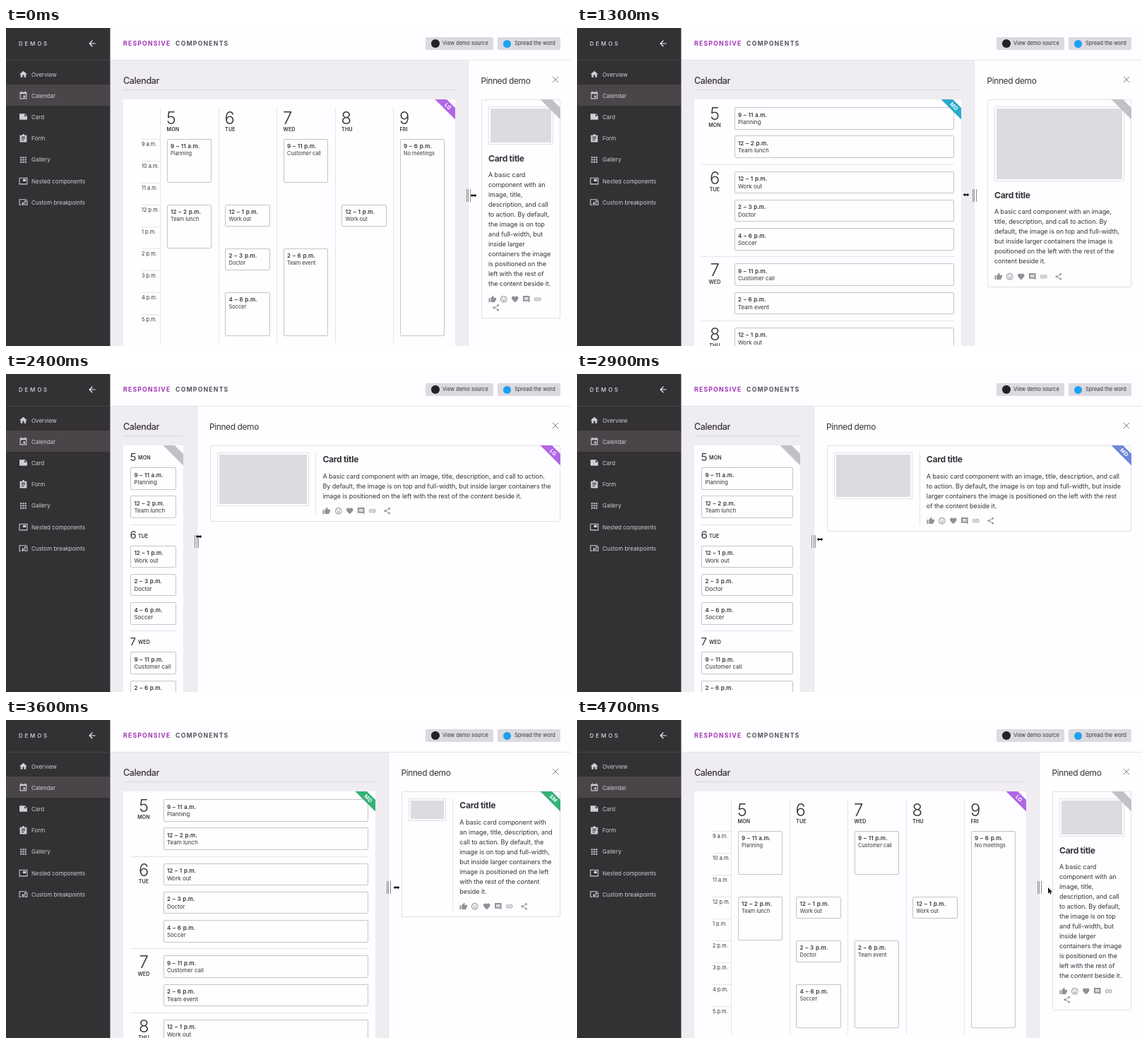
Animation, 800 px wide and 450 px high, one loop 5000 ms. Source, as an HTML page:

```html
<!DOCTYPE html>
<html lang="en">
<head>
<meta charset="utf-8">
<title>Responsive components</title>
<style>
  html, body { margin: 0; width: 100%; height: 100%; overflow: hidden; background: #fefdff; }
  #stage { position: relative; width: 800px; height: 450px; overflow: hidden; color: #38343a;
    font-family: Inter, "Open Sans", sans-serif; font-size: 8px; }
  #stage div, #stage svg { position: absolute; box-sizing: border-box; }
  #view { inset: 0; }
  .t { line-height: 20px; white-space: nowrap; }
  .mid { transform: translateX(-50%); }
  .side { background: #333134; }
  .rule { background: #e6e4e9; }
  .active { background: #494549; }
  .demos { color: #dddbdf; font-weight: 500; letter-spacing: 2.75px; }
  .nav { color: #d0ced2; }
  .brand { font-size: 8.7px; font-weight: 700; letter-spacing: 1.2px; color: #57515a; }
  .hot { color: #a136b4; }
  .btn { background: #dcdae0; border-radius: 2px; }
  .btnText { font-size: 7.4px; }
  .dot { border-radius: 50%; }
  .page { background: #efedf1; }
  .white { background: #fefdff; }
  .heading { font-size: 12.5px; font-weight: 500; letter-spacing: -.03em; }
  .pinned { font-size: 11.9px; letter-spacing: -.03em; }
  .bar { background: #8a888c; }
  .event { border: 1px solid #c6c4c9; border-radius: 2px; background: #fefdff; }
  .when { font-weight: 600; word-spacing: .75px; }
  .small, .hour { font-size: 7.35px; }
  .num { font-size: 23.8px; font-weight: 300; letter-spacing: -.02em; }
  .num.inline { font-size: 15px; font-weight: 400; }
  .day { font-size: 7.1px; font-weight: 600; letter-spacing: .1px; }
  .card { border: 1px solid #e2e0e5; border-radius: 2px; padding: 9px 9px 8.5px; }
  #stage .card div { position: relative; }
  .card .pic { border: 1px solid #e2e0e5; padding: 2px; background: #dddbe0 content-box; }
  .card .body.split { border-left: 1px solid #e6e4e9; padding-left: 9px; }
  .card .title { font-size: 12.1px; font-weight: 700; letter-spacing: -.025em; line-height: 20px; }
  .copy { font-size: 9.05px; line-height: 14px; letter-spacing: -.009em; margin: 6.5px 0 8.75px; }
  .probe { position: absolute; white-space: nowrap; visibility: hidden; }
  .card .icons { display: flex; flex-wrap: wrap; }
  #stage .icons svg { position: static; flex: none; margin-right: 4.6px; }
  #stage .icons svg:last-child { margin-left: 5px; }
</style>
</head>
<body>
<div id="stage"><div id="view"></div><div id="chrome"></div><svg id="cursor" width="24" height="24" viewBox="-12 -12 24 24"></svg></div>
<script>
const LOOP = 5000, STEP = 100, SIDE = 147.5;
const $ = id => document.getElementById(id);

// time, splitter x, pointer offset from the splitter, pointer y
const DRAG = [
  [0, 654.5, 7, 236.5], [100, 654.5, 6.5, 236.5], [500, 654.5, 6.5, 236.5], [600, 654, 4, 236.5],
  [800, 650, -3, 236], [1000, 639, -7.5, 236], [1100, 618, -10, 236], [1300, 562.5, -12, 236],
  [1400, 528, -14, 235], [1900, 340.5, -17.5, 228.5], [2000, 309, -14, 228], [2100, 288, -8, 228],
  [2200, 277, -3, 229], [2400, 270, 3, 230], [2600, 272, 6, 232], [2700, 283, 8, 233],
  [2800, 306, 9, 233.5], [2900, 335, 9, 234], [3500, 511.5, 11, 237], [3600, 541.5, 11, 237],
  [3900, 612, 10, 237], [4100, 642, 9, 237], [4300, 653.5, 8, 237], [4400, 654.5, 8, 237],
  [4500, 654.5, 12, 237], [5000, 654.5, 12, 237]
];
const ARROW_FROM = 4500;

const DAYS = [
  [5, 'MON', [[9, 11, 'Planning', 'a.m.'], [12, 14, 'Team lunch']]],
  [6, 'TUE', [[12, 13, 'Work out'], [14, 15, 'Doctor'], [16, 18, 'Soccer']]],
  [7, 'WED', [[9, 11, 'Customer call'], [14, 18, 'Team event']]],
  [8, 'THU', [[12, 13, 'Work out']]],
  [9, 'FRI', [[9, 18, 'No meetings']]]
];
const COPY = 'A basic card component with an image, title, description, and call to action. ' +
  'By default, the image is on top and full-width, but inside larger containers the image ' +
  'is positioned on the left with the rest of the content beside it.';
const COLORS = { LG: [176, 103, 230], MD: [42, 168, 204], SM: [51, 178, 118], '': [194, 192, 196] };

const grid = [4, 10, 16].flatMap(x => [4, 10, 16].map(y => `M${x} ${y}h4v4h-4z`)).join('');
const ICONS = {
  back: 'M20 11H7.8l5.6-5.6L12 4l-8 8 8 8 1.4-1.4L7.8 13H20z',
  home: 'M10 20v-6h4v6h5v-8h3L12 3 2 12h3v8z',
  date: 'M3 3h3V1h2v2h8V1h2v2h3v18H3zM5 8v11h14V8zM12 12h5v5h-5z',
  note: 'M2 4h14l6 6v10H2zM15 5.5V11h5.5z',
  form: 'M3 3h6a3 3 0 0 1 6 0h6v18H3zM7 7v2h10V7zM7 11v2h10v-2zM7 15v2h7v-2z',
  grid,
  nest: 'M1 3h22v18H1zM3 5v14h18V5zM11 7h8v6h-8z',
  device: 'M1 4h20v2H3v12h4v2H1zM15 8h8v12h-8zM17 10v8h4v-8zM9 12h4v8H9z',
  thumb: 'M1 9h4v12H1zM7 9l7-8 2 2-1 5h8v4l-4 9H7z',
  smile: 'M12 2a10 10 0 1 0 .01 0zM12 4a8 8 0 1 1-.01 0zM8.5 8a1.5 1.5 0 1 0 .01 0z' +
    'M15.5 8a1.5 1.5 0 1 0 .01 0zM7 14h10a5.4 5.4 0 0 1-10 0z',
  heart: 'M12 21.3C5.4 15.4 2 12.3 2 8.5 2 5.4 4.4 3 7.5 3c1.7 0 3.4.8 4.5 2.1C13.1 3.8 14.8 3 16.5 3 ' +
    '19.6 3 22 5.4 22 8.5c0 3.8-3.4 6.9-10 12.8z',
  chat: 'M2 2h20v20l-4-4H2zM6 6v2h12V6zM6 9v2h12V9zM6 12v2h12v-2z',
  link: 'M11 7v2H7a3 3 0 0 0 0 6h4v2H7A5 5 0 0 1 7 7zM13 7h4a5 5 0 0 1 0 10h-4v-2h4a3 3 0 0 0 0-6h-4zM8 11h8v2H8z',
  share: 'M18 2a3 3 0 1 0 .01 0zM6 9a3 3 0 1 0 .01 0zM18 16a3 3 0 1 0 .01 0z' +
    'M8.4 9.9l7-4.1 1 1.7-7 4.1zM8.4 14.1l7 4.1 1-1.7-7-4.1z'
};

const box = (x, y, w, h, cls, css = '') =>
  `<div class="${cls}" style="left:${x}px;top:${y}px;width:${w}px;height:${h}px;${css}"></div>`;
const text = (x, y, str, cls) =>
  `<div class="t ${cls}" style="left:${x}px;top:${y - 10}px">${str}</div>`;
const icon = (name, size, fill, css = '') =>
  `<svg width="${size}" height="${size}" viewBox="0 0 24 24" style="${css}">` +
  `<path fill="${fill}" fill-rule="evenodd" d="${ICONS[name]}"/></svg>`;
const iconAt = (x, y, name, size, fill) =>
  icon(name, size, fill, `left:${x - size / 2}px;top:${y - size / 2}px`);

function drawChrome() {
  const nav = [['Overview', 'home'], ['Calendar', 'date'], ['Card', 'note'], ['Form', 'form'],
    ['Gallery', 'grid'], ['Nested components', 'nest'], ['Custom breakpoints', 'device']];
  const items = nav.map(([label, name], i) => {
    const y = 65.5 + 30.2 * i;
    return iconAt(24, y, name, 13, '#d0ced2') + text(36, y, label, 'nav');
  }).join('');
  const edge = `<svg width="148" height="450" style="left:0;top:0"><path fill="#333134" d="M0 0H${SIDE}V450H0z"/></svg>`;
  $('chrome').innerHTML =
    box(SIDE - .5, 0, 653, 45, 'white') + box(SIDE - .5, 45, 653, 1, 'rule') +
    edge + box(0, 45, 147, 1, 'active') + box(0, 80, 147, 30, 'active') +
    text(18, 22, 'DEMOS', 'demos') + iconAt(122, 22, 'back', 14, '#f4f2f5') + items +
    text(166, 22, 'RESPONSIVE', 'brand hot') + text(240, 22, 'COMPONENTS', 'brand') +
    box(594, 13, 96, 18, 'btn') + box(602, 16, 11.5, 11.5, 'dot', 'background:#242225') +
    text(618, 22.4, 'View demo source', 'btnText') +
    box(695.5, 13, 89.5, 18, 'btn') + box(703.5, 16.5, 11, 11, 'dot', 'background:#1da1f2') +
    text(720, 22.4, 'Spread the word', 'btnText');
}

function pose(t) {
  const i = Math.max(1, DRAG.findIndex(k => k[0] >= t));
  const a = DRAG[i - 1], b = DRAG[i], p = (t - a[0]) / (b[0] - a[0]);
  const [split, dx, y] = [1, 2, 3].map(n => a[n] + (b[n] - a[n]) * p);
  return { split, dx, y, calRight: split - 19, cardLeft: split + 18.5 };
}
const mode = w => w >= 436 ? 'LG' : w >= 327 ? 'MD' : w >= 218 ? 'SM' : '';
const calMode = p => mode(p.calRight - 166);
const cardMode = p => mode(785 - p.cardLeft);

function ribbon(right, label, before, blend) {
  const from = COLORS[before], rgb = COLORS[label].map((c, i) => from[i] + (c - from[i]) * blend);
  return `<svg width="28" height="28" style="left:${right - 28}px;top:101px">` +
    `<path d="M-.5 0H16L28 12V28.5z" fill="rgb(${rgb.map(Math.round)})"/>` +
    `<text transform="translate(18 10) rotate(45)" y="2.6" text-anchor="middle" fill="#fff" ` +
    `font-size="7.4" font-weight="700" letter-spacing=".4">${label}</text></svg>`;
}

const label = ([from, to, , half = 'p.m.']) => `${from > 12 ? from - 12 : from} – ${to > 12 ? to - 12 : to} ${half}`;
const event = (x, y, w, h, e, sub) => box(x, y, w, h, 'event') +
  text(x + 5.4, y + 10.5, label(e), 'when') + text(x + 5.4, y + 21, e[2], sub);

function weekGrid(right) {
  const col = (right - 5 - 218) / 5, top = 157, hour = 31;
  let html = '';
  for (let i = 0; i < 9; i++) {
    const h = 9 + i, y = top + hour * i;
    html += box(192, y, 26, 1, 'rule') +
      text(192, y + 8, `${h > 12 ? h - 12 : h} ${h < 12 ? 'a' : 'p'}.m.`, 'hour');
  }
  DAYS.forEach(([num, name, events], i) => {
    const x = 218 + col * i;
    html += box(x, 114, 1, 331, 'rule') + text(x + 9, 127.5, num, 'num') + text(x + 9.6, 144, name, 'day');
    for (const e of events)
      html += event(x + 9.7, top - .3 + hour * (e[0] - 9), col - 19, hour * (e[1] - e[0]) + .6, e, 'small');
  });
  return html;
}

function dayList(right, stacked) {
  const pitch = 40.25, left = stacked ? 176 : 222.5;
  let y = stacked ? 132 : 112, html = '';
  for (const [num, name, events] of DAYS) {
    html += stacked
      ? text(175.5, y - 14.5, num, 'num inline') + text(187, y - 13, name, 'day')
      : text(195, y + 10, num, 'num mid') + text(195, y + 26.4, name, 'day mid');
    for (const e of events) {
      html += event(left, y, right - 10 - left, 31.5, e, '');
      y += pitch;
    }
    html += box(176, y, right - 186, 1, 'rule');
    y += stacked ? 30 : 10;
  }
  return html;
}

// Keeps line breaks steady across font builds.
function measureWrap() {
  const probe = document.createElement('span');
  probe.className = 'copy probe';
  probe.textContent = COPY.slice(0, COPY.indexOf(' to action'));
  $('stage').append(probe);
  const scale = probe.getBoundingClientRect().width / 274;
  probe.remove();
  return scale;
}

function card(p, size) {
  const inner = 785 - p.cardLeft - 20, split = size !== '';
  const picW = split ? (inner - 20) * 2 / 7 : inner;
  const copyW = split ? inner - picW - 20 : inner;
  const picH = (picW - 6) * 9 / 16 + 6;
  const icons = ['thumb', 'smile', 'heart', 'chat', 'link', 'share'].map(n => icon(n, 11.5, '#929095')).join('');
  return `<div class="card" style="left:${p.cardLeft}px;top:101px;width:${inner + 20}px;display:${split ? 'flex' : 'block'}">` +
    `<div class="pic" style="flex:none;width:${picW}px;height:${picH}px;margin-${split ? 'right' : 'bottom'}:9.5px"></div>` +
    `<div class="body ${split ? 'split' : ''}"><div class="title">Card title</div>` +
    `<div class="copy" style="width:${copyW * wrapScale}px">${COPY}</div>` +
    `<div class="icons" style="width:${copyW}px">${icons}</div></div></div>`;
}

function drawCursor(p, arrow) {
  const d = arrow ? 'M0 0v8.6l2-1.8 1.4 3 1.3-.7-1.3-2.8h2.7z'
    : 'M-4.3 0l2.7-2.4v1.5h3.2v-1.5l2.7 2.4-2.7 2.4v-1.5h-3.2v1.5z';
  const c = $('cursor');
  c.innerHTML = `<path d="${d}" fill="#111" stroke="#fff" stroke-width="1" paint-order="stroke"/>`;
  c.style.left = p.split + p.dx - 12 + 'px';
  c.style.top = p.y - 12 + 'px';
}

function draw(t) {
  const p = pose(t), last = pose(Math.max(0, t - STEP));
  const right = p.calRight, size = calMode(p), pinned = cardMode(p);
  const calBlend = size === calMode(last) ? 1 : 0;
  const edge = p.split - .5;
  const bars = [-2.5, 0, 2.5].map(d => box(edge + d, 228, 1, 18, 'bar')).join('');
  $('view').innerHTML =
    box(147, 45, edge - 147, 405, 'page') +
    text(166, 74.8, 'Calendar', 'heading') + box(166, 87, right - 166, 1, '', 'background:#dad8dd') +
    box(166, 101, right - 166, 349, 'white') +
    (size === 'LG' ? weekGrid(right) : dayList(right, size === '')) +
    ribbon(right, size, calMode(last), calBlend) +
    box(edge, 45, 800 - edge, 405, 'white') + box(edge, 45, 1, 405, 'rule') +
    text(p.cardLeft - .5, 74.8, 'Pinned demo', 'pinned') +
    '<svg width="10" height="10" style="left:773px;top:68px"><path d="M1 1l8 8M9 1l-8 8" stroke="#838186"/></svg>' +
    card(p, pinned) + ribbon(785, pinned, cardMode(last), .5) + bars;
  drawCursor(p, t >= ARROW_FROM);
}

const wrapScale = measureWrap();
const start = performance.now();
let shown = -1;
function tick() {
  const t = Math.floor((performance.now() - start) % LOOP / STEP) * STEP;
  if (t !== shown) draw(shown = t);
  requestAnimationFrame(tick);
}
drawChrome();
tick();
</script>
</body>
</html>
```
